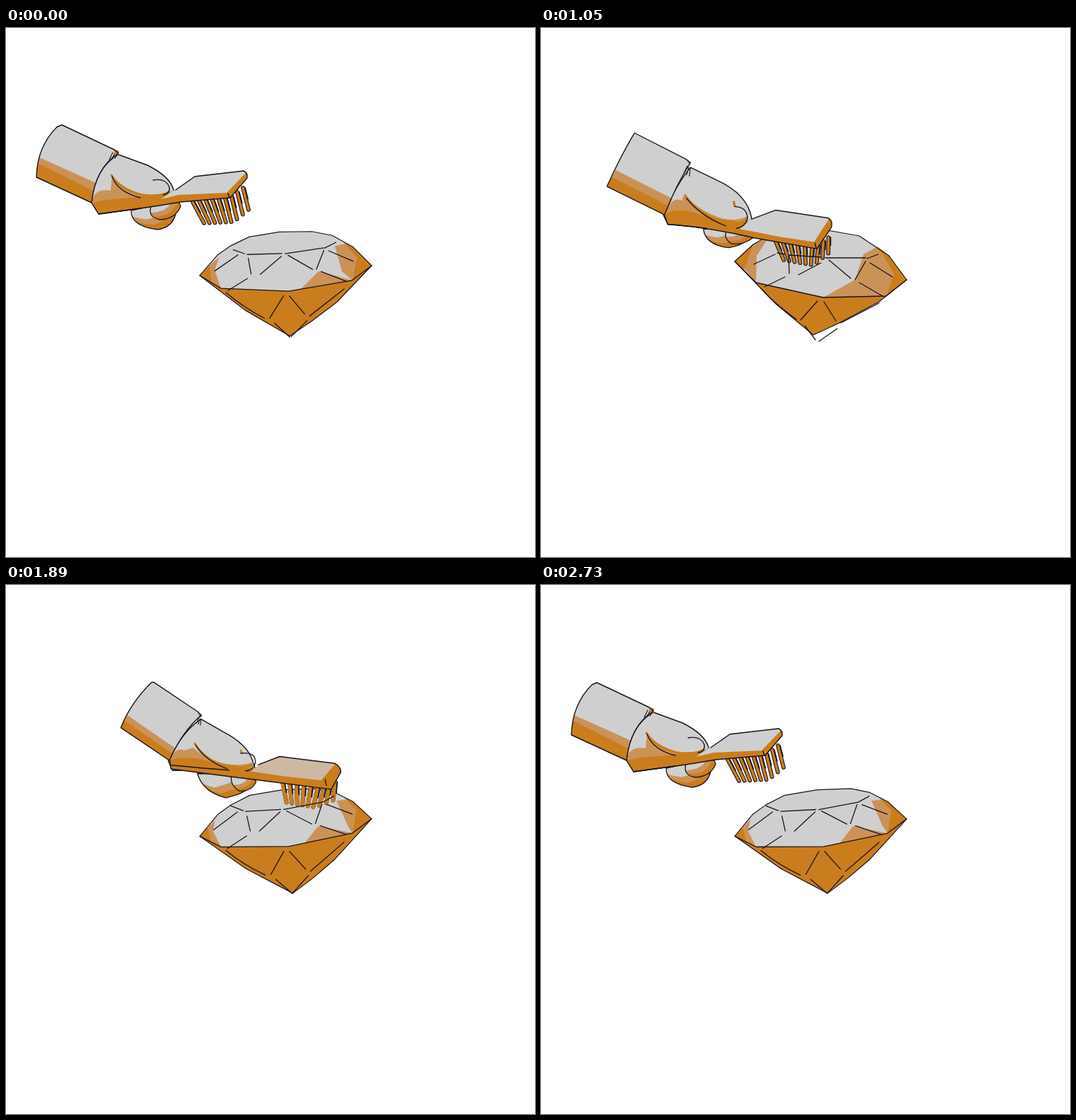
Animation of 748 by 748 pixels, one loop 2800 ms. Source, as an HTML page with a canvas:

```html
<!DOCTYPE html>
<html lang="en">
<head>
<meta charset="utf-8">
<title>Brushing a gem</title>
<style>
html, body { margin: 0; width: 100%; height: 100%; overflow: hidden; background: #fff; }
canvas { display: block; width: 748px; height: 748px; }
</style>
</head>
<body>
<canvas id="stage" width="748" height="748"></canvas>
<script>
const ctx = document.getElementById('stage').getContext('2d');
const LOOP = 2800, STEP = 70;
const GRAY = '#cfcfcf', ORANGE = '#ca7d1c', TAN = '#cb9258', INK = '#17151f';

// Gem shapes, tilted to the left and to the right
const gem = {
  body: ['M274,357 L299,326 L318,312 L345,298 L392,290 L440,288 L465,293 L490,305 L517,329 L464,388 L435,414 L407,436 L340,402 Z',
         'M274,330 L300,306 L318,296 L340,288 L370,284 L411,287 L450,294 L492,322 L517,356 L478,387 L424,416 L385,434 L332,390 Z'],
  base: ['M274,357 L304,371 L400,369 L490,349 L517,329 L464,388 L435,414 L407,436 L340,402 Z',
         'M274,330 L304,360 L399,381 L488,379 L517,356 L478,387 L424,416 L385,434 L332,390 Z'],
  leftTan: ['M283,347 L294,334 L292,350 L304,371 L292,366 Z', 'M300,306 L322,296 L305,322 L304,360 L287,340 Z'],
  leftEdge: ['M274,357 L284,346 L292,367 Z', 'M274,330 L300,306 L287,342 Z'],
  rightTan: ['M468,304 L484,303 L495,318 L490,349 L486,340 Z', 'M456,320 L476,309 L499,348 L488,379 L444,356 Z'],
  rightEdge: ['M478,300 L490,305 L517,329 L490,349 L495,317 Z', 'M476,309 L492,322 L517,356 L488,379 L499,348 Z'],
  facet: ['M441,340 L452,342 L490,349 L424,364 Z', 'M444,356 L444,356 L488,379 L399,381 Z'],
  girdle: ['M274,357 L304,371 L400,369 L490,349 L517,329', 'M274,330 L304,360 L399,381 L488,379 L517,356'],
  crown: ['M317,312 L335,319 M338,320 L388,317 M392,317 L446,306 M447,306 L463,297 M293,347 L327,321 M340,327 L345,348 M313,373 L340,355',
          'M334,318 L345,320 M350,321 L396,324 M402,325 L459,325 M461,326 L477,320 M301,334 L331,320 M350,322 L351,347 M316,366 L345,352'],
  facets: ['M387,320 L358,348 M396,319 L432,337 M446,309 L437,336 M453,309 L489,322 M444,339 L481,351',
           'M396,332 L364,349 M407,328 L438,354 M459,330 L444,356 M465,332 L497,352 M450,360 L483,379'],
  lower: ['M311,376 Q336,396 367,410 M393,376 L375,409 M401,376 L424,401 M431,404 L478,362 M382,416 L406,436 M407,434 L428,410',
          'M311,368 Q328,388 361,412 M391,386 L367,413 M400,387 L417,414 M424,417 L478,389 M373,421 L388,441 M393,443 L419,425']
};

// Arm shapes: raised, scrubbing, side view
const arm = {
  sleeve: ['M79,137 L153,172 L159,177 Q126,198 121,247 L43,211 Q44,168 72,140 Z',
           'M129,153 L202,190 L208,195 Q190,226 172,269 L90,229 Q108,192 128,155 Z',
           'M270,146 L312,194 L317,200 Q276,208 257,246 L212,190 Q217,160 264,143 Z'],
  sleeveTan: ['M47,183 L127,219 L121,247 L43,211 Z', 'M103,206 L184,247 L172,269 L90,229 Z', 'M214,181 L259,237 L257,247 L212,190 Z'],
  sleeveDark: ['M45,191 L123,230 L121,247 L43,211 Z', 'M97,216 L178,257 L172,269 L90,229 Z', 'M213,184 L258,240 L257,248 L212,190 Z'],
  cuff: ['M152,171 L160,174 L159,180 L155,178 Z', 'M203,190 L208,194 L207,197 L205,196 Z', 'M311,194 L319,201 L318,206 L314,203 Z'],
  hand: ['M159,179 L200,194 Q232,210 237,229 L246,245 Q200,254 131,263 L121,247 Q126,198 159,179 Z',
         'M208,202 L245,220 Q290,240 296,276 L290,292 Q240,288 176,282 L170,269 Q190,226 208,202 Z',
         'M316,203 L340,222 Q352,234 362,234 L383,240 Q374,252 262,262 L256,248 Q276,208 316,203 Z'],
  handTan: ['M150,207 Q160,224 190,234 Q215,238 237,230 L246,245 L131,263 L121,247 Q124,226 148,230 Z',
            'M200,240 Q215,262 255,276 Q275,280 290,272 L290,292 L176,282 L172,269 Q182,242 196,248 Z',
            'M300,246 Q310,246 325,247 Q350,250 375,248 L374,255 L260,258 L258,246 Q262,238 275,244 Z'],
  handDark: ['M121,247 Q150,240 190,240 L246,236 L246,246 Q200,255 131,263 Z',
             'M172,269 Q190,255 225,271 L290,283 L290,295 Q240,289 176,282 Z',
             'M257,247 Q290,246 330,249 L374,252 L374,262 Q300,262 256,256 Z'],
  rim: ['M149,208 Q160,228 192,236 Q214,240 230,232', 'M201,243 Q222,270 258,282 Q278,286 288,278', 'M304,226 Q304,240 325,247 Q350,249 373,248'],
  crease: ['M150,210 Q158,232 190,240', 'M203,247 Q224,272 261,287', 'M304,225 Q304,241 325,247'],
  thumb: ['M208,215 Q226,212 231,225 Q232,235 222,236', 'M272,259 Q290,260 290,276 Q287,289 274,291', 'M358,236 Q386,228 383,243 Q381,250 373,249'],
  spot: ['M209,216 L210,216', 'M271,252 L272,257', 'M360,237 L361,237'],
  wrinkles: ['M151,176 L146,186 M154,177 L150,185 M157,179 L154,184', 'M204,200 L199,211 M206,202 L203,213 M208,203 L207,215', 'M315,201 L314,202 M315,202 L314,203 M316,203 L315,204'],
  palm: ['M177,258 Q176,280 214,285 Q236,282 240,262 L235,245 Z', 'M227,290 Q230,312 262,316 Q285,312 292,302 L290,290 Z', 'M270,260 Q285,292 318,308 Q345,300 357,294 L372,262 Z'],
  low: ['M180,260 Q184,274 200,280 Q214,280 212,270 Q205,257 190,256 Z', 'M230,292 Q232,304 246,308 Q260,306 258,298 Q250,290 240,290 Z', 'M302,276 Q304,292 318,306 Q332,306 330,297 Q318,274 307,272 Z'],
  mid: ['M180,258 Q182,272 200,280 Q214,280 212,268 Q205,255 190,254 Z', 'M230,292 Q232,304 246,308 Q262,306 260,298 Q250,290 240,290 Z', 'M308,262 Q312,285 335,301 Q354,300 355,290 Q338,252 318,256 Z'],
  tip: ['M205,252 Q200,268 218,271 Q240,270 247,252 Q245,242 230,244 Z', 'M262,290 Q254,302 266,311 Q282,314 297,304 Q295,294 285,290 Z', 'M341,262 Q344,282 363,291 Q382,288 374,268 Q362,250 344,260 Z'],
  side: ['M131,263 L125,249 L190,238 L244,232 L312,232 L337,202 Q342,206 341,212 L317,240 L247,246 Q215,252 131,263 Z',
         'M176,282 L173,270 L230,280 L280,288 L386,308 L406,278 Q412,282 410,291 L390,322 L300,305 Q240,289 176,282 Z',
         'M256,256 L258,242 L340,249 L384,249 L407,238 L488,242 Q502,250 503,254 L501,266 L412,264 Q350,271 256,256 Z'],
  top: ['M219,242 L240,228 L267,209 L335,202 L339,205 L312,233 L244,236 Z',
        'M279,291 L296,277 L330,265 L403,277 L405,281 L386,312 L340,304 Z',
        'M384,250 L390,246 L407,237 L484,241 L487,243 L470,249 L408,247 Z'],
  back: ['M240,229 L267,210 L336,202 Q342,205 341,212 L317,240', 'M296,277 L330,265 L406,278 Q412,282 410,291 L390,322', 'M384,249 L407,238 L488,242 Q502,250 503,254 L501,266'],
  under: ['M121,247 L131,263 Q215,252 247,246 L317,240', 'M172,270 L176,282 Q240,289 300,305 L390,322', 'M258,242 L256,256 Q350,271 412,264 L501,266'],
  handle: ['M131,263 L160,259 L190,255', 'M176,282 L203,285 L230,289', 'M258,242 L340,249 L384,249'],
  edge: ['M314,234 L316,240', 'M387,314 L389,321', 'M483,242 L484,252'],
  roots: ['M264,246 L314,241 L335,226', 'M330,308 L388,320 L406,306', 'M416,252 L468,257 L489,265'],
  ends: ['M280,276 L322,274 L343,257', 'M342,336 L384,344 L405,327', 'M413,292 L452,297 L483,299'],
  pivot: ['M340,203', 'M409,280', 'M503,254']
};

// time, dx, dy, turn, scrubbing share, side-view share, size
const armKeys = [
  [0, 0, 0, 0, 0, 0, 1], [70, 0, 2, 0, .03, 0, 1], [420, -34, -1, -3.7, 1, 0, 1.005], [560, -36, 0, -3.7, 1, 0, 1],
  [840, 0, 0, 0, 1, 0, 1], [1120, 9, -2, .4, .87, 0, 1], [1330, 10, -5, .7, .85, 0, .995], [1610, 25, -16, .2, 1, 0, 1.02],
  [1750, 37, -17, 0, 1, 0, 1.02], [1960, 22, -9, 0, .4, .6, 1], [2170, 0, 0, 0, 0, 1, 1], [2240, 12, 0, 0, 0, 1, 1],
  [2380, 65, -2, 0, 0, 1, 1], [2660, 0, 1, 0, 0, 0, 1], [2730, 0, 1, 0, 0, 0, 1], [2800, 0, 0, 0, 0, 0, 1]
];
const gemKeys = [
  [0, .26], [420, .89], [840, 1], [1100, 1], [1330, .93], [1610, .33],
  [1890, .06], [2170, 0], [2590, 0], [2730, .07], [2800, .26]
];

// Monotone cubic through the keys
function track(keys, t, col) {
  const n = keys.length - 1;
  let i = 0;
  while (i < n - 1 && keys[i + 1][0] <= t) i++;
  const rate = j => (keys[j + 1][col] - keys[j][col]) / (keys[j + 1][0] - keys[j][0]);
  const slope = j => {
    const a = rate((j + n - 1) % n), b = rate(j % n);
    return a * b > 0 ? 2 * a * b / (a + b) : 0;
  };
  const h = keys[i + 1][0] - keys[i][0], u = (t - keys[i][0]) / h;
  const a = keys[i][col], b = keys[i + 1][col], v = 1 - u;
  return a * (1 + 2 * u) * v * v + b * u * u * (3 - 2 * u) + h * u * v * (slope(i) * v - slope(i + 1) * u);
}

const NUM = /-?\d+(\.\d+)?/g;
const numbers = s => s.match(NUM).map(Number);

function blend(shapes, weights) {
  const sets = shapes.map(numbers);
  let i = 0;
  return shapes[0].replace(NUM, () => {
    const v = sets.reduce((sum, set, k) => sum + set[i] * weights[k], 0);
    i++;
    return v.toFixed(2);
  });
}

function paint(d, fill, line, width = 1.4) {
  const p = new Path2D(d);
  if (fill) { ctx.fillStyle = fill; ctx.fill(p); }
  if (line) { ctx.strokeStyle = line; ctx.lineWidth = width; ctx.stroke(p); }
}

// Point at share u of a two-segment line
function along(c, u) {
  const split = .68, k = u < split ? 0 : 2;
  const f = k ? (u - split) / (1 - split) : u / split;
  return [c[k] + (c[k + 2] - c[k]) * f, c[k + 1] + (c[k + 3] - c[k + 1]) * f];
}

function drawBristles(shape, sideView) {
  const roots = numbers(shape('roots')), ends = numbers(shape('ends'));
  const count = 9;
  for (let i = 0; i < count; i++) {
    const u = i / (count - 1), a = along(roots, u), b = along(ends, u);
    const d = `M${a} L${b}`;
    paint(d, null, INK, 5.8);
    paint(d, null, ORANGE, 3.6 + 5 * sideView);
    const x = (a[0] + b[0]) / 2 + 3, y = (a[1] + b[1]) / 2 + 6 * sideView;
    paint(`M${a[0] + 3},${a[1]} L${x},${y}`, null, INK, 1.8);
    if (sideView > .5) {
      paint(d, null, INK, 1.2);
      paint(`M${b} l5,1`, null, INK, 2);
    }
  }
}

function drawFinger(d, shift) {
  paint(d, ORANGE);
  ctx.save();
  ctx.clip(new Path2D(d));
  ctx.translate(-shift * .5, -shift * .4);
  paint(d, TAN);
  ctx.translate(-shift * .5, -shift * .5);
  paint(d, GRAY);
  ctx.restore();
  paint(d, null, INK, 1.3);
}

function draw(t) {
  ctx.clearRect(0, 0, 748, 748);
  ctx.lineJoin = ctx.lineCap = 'round';

  const tilt = track(gemKeys, t, 1);
  const facet = name => blend(gem[name], [1 - tilt, tilt]);
  paint(facet('body'), GRAY);
  for (const name of ['rightTan', 'facet', 'leftTan']) paint(facet(name), TAN);
  for (const name of ['leftEdge', 'rightEdge', 'base']) paint(facet(name), ORANGE);
  paint(facet('body'), null, INK, 1.2);

  const [dx, dy, turn, scrub, sideView, size] = [1, 2, 3, 4, 5, 6].map(c => track(armKeys, t, c));
  const weights = [1 - scrub - sideView, scrub, sideView];
  const shape = name => blend(arm[name], weights);
  const [px, py] = numbers(shape('pivot'));
  const place = () => {
    ctx.save();
    ctx.translate(px + dx, py + dy);
    ctx.rotate(turn * Math.PI / 180);
    ctx.scale(size, size);
    ctx.translate(-px, -py);
  };
  const inFront = sideView > .5;

  if (!inFront) {
    place();
    drawBristles(shape, sideView);
    ctx.restore();
  }
  for (const name of ['girdle', 'crown', 'facets', 'lower']) paint(facet(name), null, INK, 1.3);

  place();
  const shift = 11 - 4 * sideView;
  const fingers = () => {
    if (inFront) for (const name of ['low', 'mid']) drawFinger(shape(name), shift);
    drawFinger(shape('tip'), shift);
  };
  drawFinger(shape('palm'), inFront ? 9 : 16);
  if (!inFront) fingers();

  paint(shape('hand'), GRAY, INK);
  paint(shape('handTan'), TAN);
  paint(shape('handDark'), ORANGE);
  if (!inFront) paint(shape('rim'), null, ORANGE, 3);

  paint(shape('sleeve'), GRAY);
  paint(shape('sleeveTan'), TAN);
  paint(shape('sleeveDark'), ORANGE);
  paint(shape('cuff'), ORANGE);
  paint(shape('sleeve'), null, INK);
  paint(shape('wrinkles'), null, INK, 1.1);

  paint(shape('side'), ORANGE);
  const topTone = [207 - 4 * sideView, 207 - 61 * sideView, 207 - 119 * sideView];
  paint(shape('top'), `rgb(${topTone.map(Math.round)})`);
  for (const name of ['back', 'under', 'handle', 'edge']) paint(shape(name), null, INK);
  paint(shape('spot'), null, ORANGE, .5 + 3.5 * scrub);
  for (const name of ['crease', 'thumb']) paint(shape(name), null, INK, 1.3);

  if (inFront) {
    drawBristles(shape, sideView);
    fingers();
  }
  ctx.restore();
}

function tick() {
  draw(Math.floor(performance.now() % LOOP / STEP) * STEP);
  requestAnimationFrame(tick);
}
tick();
</script>
</body>
</html>
```
